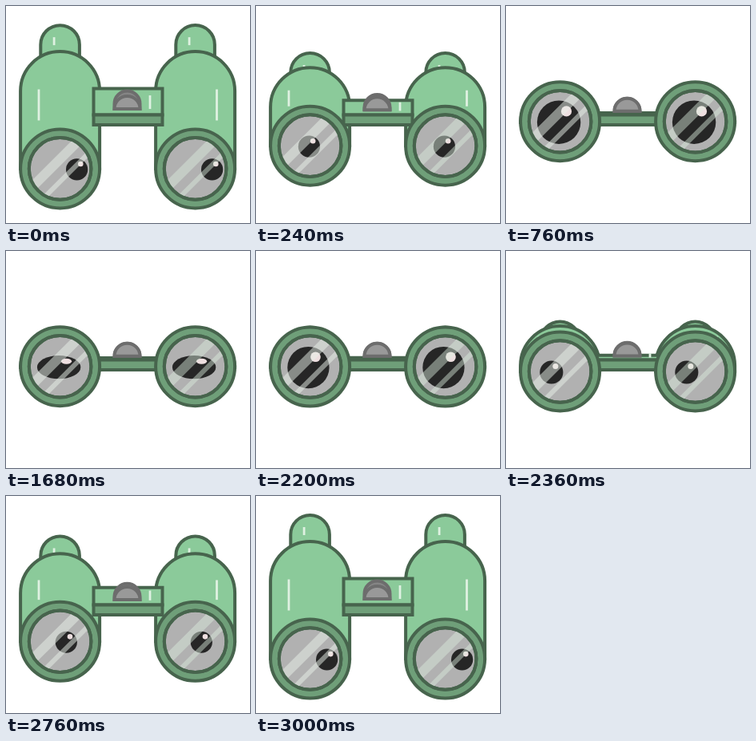
An HTML page with a canvas that plays this animation: 305x272 px, repeating every 3040 ms.

```html
<!DOCTYPE html>
<html lang="en">
<head>
<meta charset="utf-8">
<title>Binoculars</title>
<style>
  html, body { margin: 0; width: 100%; height: 100%; overflow: hidden; background: #fff; }
  canvas { display: block; width: 305px; height: 272px; }
</style>
</head>
<body>
<canvas></canvas>
<script>
const LOOP = 3040;
const OUTLINE = '#47644d', LIGHT = '#8bca9a', DARK = '#6f9f79', SHINE = '#dff1e2';
const canvas = document.querySelector('canvas');
const ctx = canvas.getContext('2d');
const ratio = window.devicePixelRatio || 1;
canvas.width = 305 * ratio;
canvas.height = 272 * ratio;

const lerp = (a, b, k) => a + (b - a) * k;

function bezier(x1, y1, x2, y2) {
  const at = (a, b, s) => 3 * a * s * (1 - s) ** 2 + 3 * b * s * s * (1 - s) + s ** 3;
  return x => {
    let lo = 0, hi = 1;
    for (let i = 0; i < 24; i++) {
      const mid = (lo + hi) / 2;
      if (at(x1, x2, mid) < x) lo = mid; else hi = mid;
    }
    return at(y1, y2, lo);
  };
}
const smooth = bezier(.333, 0, .667, 1);
const settle = bezier(.167, .167, .667, 1);
const depart = bezier(.333, 0, .833, .833);

// keys: [time, value, easing towards this key]
function track(t, keys) {
  for (let i = 1; i < keys.length; i++) {
    const [start, from] = keys[i - 1], [end, to, ease = smooth] = keys[i];
    if (t < end) return lerp(from, to, ease((t - start) / (end - start)));
  }
  return keys[keys.length - 1][1];
}

function paint(path, fill, stroke = OUTLINE, width = 4) {
  ctx.fillStyle = fill;
  ctx.fill(path);
  ctx.strokeStyle = stroke;
  ctx.lineWidth = width;
  ctx.stroke(path);
}

function disc(x, y, r, fill) {
  ctx.fillStyle = fill;
  ctx.fill(circle(x, y, r));
}

function shine(x, y1, y2) {
  ctx.fillStyle = SHINE;
  ctx.fillRect(x - 1.4, y1, 2.8, y2 - y1);
}

function dome(x, top, r, bottom) {
  return new Path2D(`M${x - r} ${bottom}V${top + r}a${r} ${r} 0 0 1 ${2 * r} 0V${bottom}Z`);
}

function circle(x, y, r) {
  const path = new Path2D();
  path.arc(x, y, r, 0, 7);
  return path;
}

function drawBarrel(x, shineX, tilt) {
  const lensY = lerp(204, 145, tilt), bodyTop = lerp(57, 98.5, tilt), capTop = lerp(24, 96, tilt);
  paint(dome(x, capTop, 24.3, bodyTop + 40), LIGHT);
  shine(x - 7.5, capTop + 15, capTop + 15 + 10 * (1 - tilt));
  paint(dome(x, bodyTop, 49.5, lensY), LIGHT);
  const shineTop = lerp(104.5, 107, tilt);
  shine(shineX, shineTop, shineTop + 39 * (1 - tilt));
}

function drawBridge(tilt) {
  const top = lerp(103.5, 134, tilt), middle = 136.5, bottom = 149;
  const rect = (y1, y2) => new Path2D(`M109.5 ${y1}H195.5V${y2}H109.5Z`);
  paint(rect(top, middle), LIGHT);
  if (tilt < .97) shine(180, lerp(112, 130, tilt), lerp(129, 134, tilt));
  paint(rect(middle, bottom), DARK);

  const base = lerp(129, 131.7, tilt), depth = 6.5 * (1 - tilt);
  paint(dome(151.5, base - 16 - depth, 16, base), '#858585', '#6d6d6d');
  paint(dome(151.5, base - 16, 16, base), '#999', '#6d6d6d');
}

function drawLens(x, tilt, eye, reflection) {
  const y = lerp(204, 144.7, tilt);
  const glass = circle(x, y, 38.8);
  paint(circle(x, y, 49.5), DARK);
  paint(glass, '#b1b1b1');

  ctx.save();
  ctx.clip(glass);
  ctx.save();
  ctx.translate(x + eye.x, y + eye.y);
  ctx.scale(eye.size, eye.size * eye.open);
  disc(0, 0, 13.6, '#262626');
  disc(4.7, -6.9, 3.3, '#eedfe0');
  ctx.restore();
  ctx.translate(x, y);
  ctx.rotate(-Math.PI / 4);
  ctx.fillStyle = reflection;
  ctx.fillRect(-50, -14.5, 100, 12);
  ctx.fillRect(-50, 8.5, 100, 6);
  ctx.restore();

  ctx.strokeStyle = OUTLINE;
  ctx.lineWidth = 4;
  ctx.stroke(glass);
}

function draw(t) {
  const tilt = track(t, [[0, 0], [640, 1, settle], [2160, 1], [3000, 0, depart]]);
  const eye = {
    x: track(t, [[0, 21], [400, -13], [480, -13], [760, -1.5], [2160, -1.5], [2440, -13], [3000, 21]]),
    y: 1,
    size: track(t, [[0, 1], [480, 1], [760, 2], [2160, 2], [2400, 1]]),
    open: Math.min(1, .1 + .9 * Math.abs(t - 1720) / 80)
  };
  ctx.setTransform(ratio, 0, 0, ratio, 0, 0);
  ctx.fillStyle = '#fff';
  ctx.fillRect(0, 0, 305, 272);
  drawBarrel(67.6, 41, tilt);
  drawBarrel(236.6, 263.5, tilt);
  drawBridge(tilt);
  drawLens(67.6, tilt, eye, 'rgba(234, 242, 234, .5)');
  drawLens(236.6, tilt, eye, 'rgba(220, 238, 222, .45)');
}

const begin = performance.now();
function frame() {
  draw((performance.now() - begin) % LOOP);
  requestAnimationFrame(frame);
}
frame();
</script>
</body>
</html>
```
